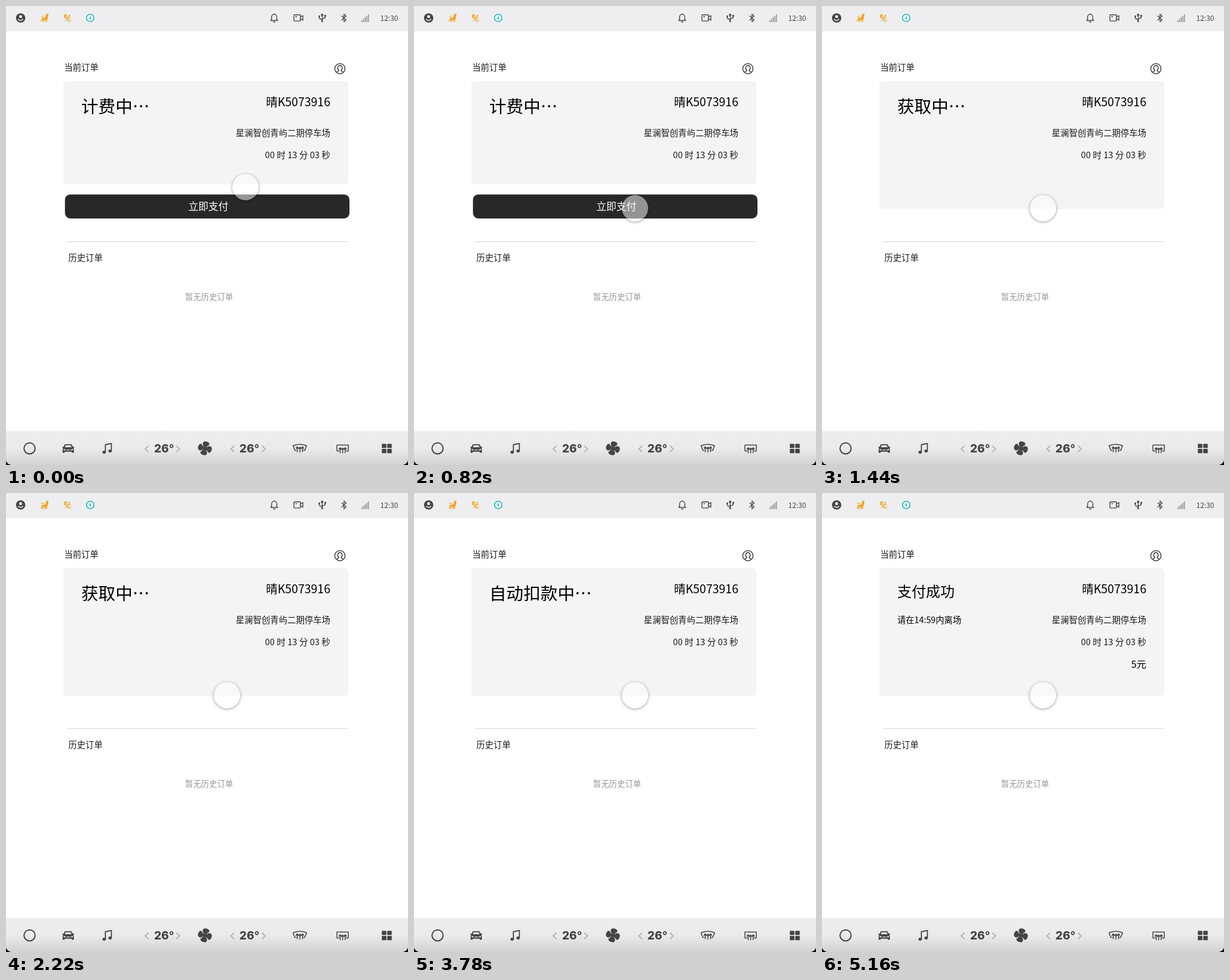
An HTML page that plays this animation: 673 px wide and 769 px high, repeating every 5180 ms.

```html
<!DOCTYPE html>
<html lang="zh-CN">
<head>
<meta charset="utf-8">
<title>停车支付</title>
<style>
  html, body { margin: 0; width: 100%; height: 100%; overflow: hidden; background: #000; }
  #stage { position: relative; width: 673px; height: 769px; overflow: hidden; background: #fff; border-radius: 0 0 10px 10px; }
  svg { position: absolute; left: 0; top: 0; display: block; }
  text { font-family: "Noto Sans CJK SC", "Noto Sans CJK", "Noto Sans", sans-serif; fill: #1c1c1c; }
  .big { font-size: 28.6px; font-weight: 500; fill: #000; }
  .mid { font-weight: 500; fill: #000; }
  .end { text-anchor: end; }
  .center { text-anchor: middle; }
  .temp { font: 800 19px Inter, "Open Sans", sans-serif; fill: #444; }
  .line { fill: none; stroke: #444; stroke-width: 1.4; stroke-linecap: round; stroke-linejoin: round; }
  .solid { fill: #444; }
  .chev { fill: none; stroke: #b5b5b7; stroke-width: 2; }
  #touch {
    position: absolute; left: -22px; top: -22px; width: 44px; height: 44px; border-radius: 50%;
    background: rgba(255,255,255,.5); box-shadow: 0 1px 5px rgba(0,0,0,.42);
  }
</style>
</head>
<body>
<div id="stage">
<svg width="673" height="769" viewBox="0 0 673 769">
  <defs>
    <linearGradient id="dock" x1="0" y1="0" x2="0" y2="1">
      <stop offset="0" stop-color="#eeeef0"/>
      <stop offset=".5" stop-color="#ebebed"/>
      <stop offset="1" stop-color="#d3d3d5"/>
    </linearGradient>
    <path id="blade" d="M0 -1C-4 -3 -6.5 -7 -4.5 -10C-2.5 -12.6 4.5 -12 5.8 -9C6.8 -6.4 2.8 -5.6 1.8 -1Z"/>
    <path id="heat" d="M0 5V-3M-2 -1L0 -3.5L2 -1"/>
  </defs>

  <!-- status bar -->
  <rect width="673" height="42.5" fill="#eeeef0"/>
  <circle class="solid" cx="24.5" cy="20" r="7.8"/>
  <circle cx="24.5" cy="17.7" r="2.5" fill="#eeeef0"/>
  <path d="M20.3 21.8Q24.5 26.8 28.7 21.8" fill="none" stroke="#eeeef0" stroke-width="1.7"/>

  <g fill="#efa31d" stroke="#efa31d" stroke-linecap="round" stroke-linejoin="round">
    <path d="M68.2 13.2L70.8 13.6L69 22.5H60V20.5L65.8 19.6Z" stroke-width=".7"/>
    <path d="M58.5 24.2H69M60.5 26.4H62M66 26.4H67.5" stroke-width="1.4" fill="none"/>
    <path d="M59 18L64 16.5" stroke-width="1.2"/>
    <circle cx="106.2" cy="16.2" r="1.3" stroke="none"/>
    <path d="M97.5 15H102M97.5 17.5H102M98 20H101.5M99 14.5V20M105 18L102.5 21.5L105.5 23.5L104 26M103 22L99.5 24.5M105 19L108 20.5M106.5 24.5L108.5 25.5" stroke-width="1.3" fill="none"/>
  </g>
  <circle cx="141" cy="20" r="6.3" fill="none" stroke="#1dbcc0" stroke-width="1.6"/>
  <path d="M141.6 16L139 20.4H140.7L140.4 24L143 19.4H141.3Z" fill="#1dbcc0"/>

  <g class="line">
    <path d="M443.3 24.2H454.7L453.4 22.2V18.4A4.4 4.6 0 0 0 444.6 18.4V22.2ZM449 13.6V12.9M447.6 26.7H450.4"/>
    <rect x="482" y="14.7" width="11" height="10.4" rx="1"/>
    <path d="M493.2 18.4L497 16V24L493.2 21.4M485 17.8H486.6"/>
    <path d="M529.3 25V14.2M527.6 15.5L529.3 13.3L531 15.5M529.3 23.6L524.4 20.6V17.5M529.3 22L534.4 19.6V16.6"/>
    <path d="M562 16.5L569.6 23.2L565.8 26.5V13.5L569.6 16.8L562 23.5" stroke-width="1.25"/>
  </g>
  <circle class="solid" cx="529.3" cy="25.6" r="1.5"/>
  <circle class="solid" cx="524.4" cy="17.2" r="1.4"/>
  <rect class="solid" x="533.1" y="15" width="2.7" height="2.7"/>
  <path d="M596 27V23.5M598.7 27V21.5M601.4 27V19M604.1 27V16.5M606.8 27V14" fill="none" stroke="#777" stroke-width="1.2"/>
  <text x="656.5" y="25.2" class="end" font-size="12" style="fill:#444">12:30</text>

  <!-- current order -->
  <text x="97.5" y="107.5" font-size="14.3">当前订单</text>
  <g class="line" style="stroke-width:1.5">
    <circle cx="559" cy="105" r="8.6"/>
    <path d="M553.8 111.2C554.2 109.3 557 109.3 557.2 108.2C553.6 104.6 555.3 99.8 559 99.8C562.7 99.8 564.4 104.6 560.8 108.2C561 109.3 563.8 109.3 564.2 111.2"/>
  </g>
  <rect id="card" x="96" y="126" width="477" height="172.5" rx="6" fill="#f4f4f4"/>
  <g id="steps">
    <text class="big" x="126" y="179">计费中⋯</text>
    <text class="big" x="126" y="179">获取中⋯</text>
    <text class="big" x="126" y="179">自动扣款中⋯</text>
    <g class="paid">
      <text class="mid" x="126" y="174" font-size="24">支付成功</text>
      <text class="mid" x="126" y="218" font-size="14.3">请在14:59内离场</text>
      <text class="mid end" x="543" y="292.5" font-size="16.4">5元</text>
    </g>
  </g>
  <text class="end" x="543" y="168" font-size="19.5" style="fill:#000">晴K5073916</text>
  <text class="end" x="543" y="217.5" font-size="14.4">星澜智创青屿二期停车场</text>
  <text class="end" x="543" y="254.5" font-size="14.7">00 时 13 分 03 秒</text>
  <g id="pay">
    <rect x="98.7" y="315.7" width="476.3" height="40.2" rx="9" fill="#282828"/>
    <text class="center" x="338.7" y="342.3" font-size="16.8" style="fill:#fff">立即支付</text>
  </g>

  <!-- history -->
  <path d="M102 394.7H572" stroke="#dcdcdc" stroke-width="1.2"/>
  <text x="104.5" y="427.3" font-size="14.3">历史订单</text>
  <text class="center" x="340" y="491.7" font-size="13.4" style="fill:#999">暂无历史订单</text>

  <!-- dock -->
  <rect y="712" width="673" height="57" fill="url(#dock)"/>
  <circle class="line" cx="39.5" cy="741.2" r="9.3" style="stroke-width:2"/>

  <path class="solid" d="M98.6 734.2H109.8L112 738.6L114 738.2V739.8L112.8 740.4Q113.6 741.4 113.6 743V748.4H110.2V746.8H98.2V748.4H94.8V743Q94.8 741.4 95.6 740.4L94.4 739.8V738.2L96.4 738.6Z"/>
  <path d="M99.8 736H108.6L109.8 739.2H98.6ZM96.4 742L100 743V744.3H96.4ZM112 742L108.4 743V744.3H112ZM101.5 743.2H106.9V744.5H101.5Z" fill="#ebebed"/>

  <path class="line" d="M166.4 747.2V735L176.4 732.8V745.2" style="stroke-width:1.8"/>
  <ellipse class="solid" cx="164.3" cy="747.4" rx="2.9" ry="2.5"/>
  <ellipse class="solid" cx="174.3" cy="745.4" rx="2.9" ry="2.5"/>

  <path class="chev" d="M238.5 736.8L233 742L238.5 747.2M285 736.8L290.5 742L285 747.2M382 736.8L376.5 742L382 747.2M428.5 736.8L434 742L428.5 747.2"/>
  <text class="temp" x="248" y="747.7">26<tspan font-weight="600">°</tspan></text>
  <text class="temp" x="390.8" y="747.7">26<tspan font-weight="600">°</tspan></text>

  <g id="fan" class="solid" transform="translate(333 741)"><circle r="2.2"/></g>

  <g class="line" style="stroke-width:1.5">
    <path d="M485.5 744.5H483.5L480.6 736.8Q492 731.6 503.2 736.8L500.2 744.5H498.2"/>
    <use href="#heat" x="487.6" y="742"/><use href="#heat" x="492" y="742.5"/><use href="#heat" x="496.4" y="742"/>
    <path d="M557.4 745.4H554V735.4H573V745.4H569.8"/>
    <use href="#heat" x="559.4" y="743.5"/><use href="#heat" x="563.6" y="744"/><use href="#heat" x="567.8" y="743.5"/>
  </g>
  <g class="solid">
    <rect x="629.2" y="733.4" width="7.6" height="7.2" rx="1"/>
    <rect x="638.2" y="733.4" width="7.6" height="7.2" rx="1"/>
    <rect x="629.2" y="742" width="7.6" height="7.2" rx="1"/>
    <rect x="638.2" y="742" width="7.6" height="7.2" rx="1"/>
  </g>
</svg>
<div id="touch"></div>
</div>
<script>
const LOOP = 5180;
const FADE = 75;
const CHANGES = [1085, 2450, 3810];
const MOVE_TIME = 620;
const FROM = [401, 303.4], TO = [370, 338.8];

const $ = id => document.getElementById(id);
const steps = [...$("steps").children];
const clamp = v => Math.min(1, Math.max(0, v));
const easeOut = v => 1 - (1 - v) ** 3;
const easeInOut = v => v * v * (3 - 2 * v);

for (let i = 0; i < 4; i++) {
  const blade = document.createElementNS("http://www.w3.org/2000/svg", "use");
  blade.setAttribute("href", "#blade");
  blade.setAttribute("transform", `rotate(${i * 90 + 12})`);
  $("fan").append(blade);
}

function draw(t) {
  // Share of each state that has already faded in, closed by 0 for the last one
  const shown = [1, ...CHANGES.map(s => easeOut(clamp((t - s) / FADE))), 0];
  steps.forEach((el, i) => el.setAttribute("opacity", shown[i] - shown[i + 1]));
  $("card").setAttribute("height", 172.5 + 41.5 * shown[1]);
  $("pay").setAttribute("opacity", 1 - shown[1]);

  const k = easeInOut(clamp(t / MOVE_TIME));
  const [x, y] = FROM.map((v, i) => v + (TO[i] - v) * k);
  $("touch").style.transform = `translate(${x}px, ${y}px)`;
}

const start = performance.now();
function tick() {
  draw((performance.now() - start) % LOOP);
  requestAnimationFrame(tick);
}
tick();
</script>
</body>
</html>
```
